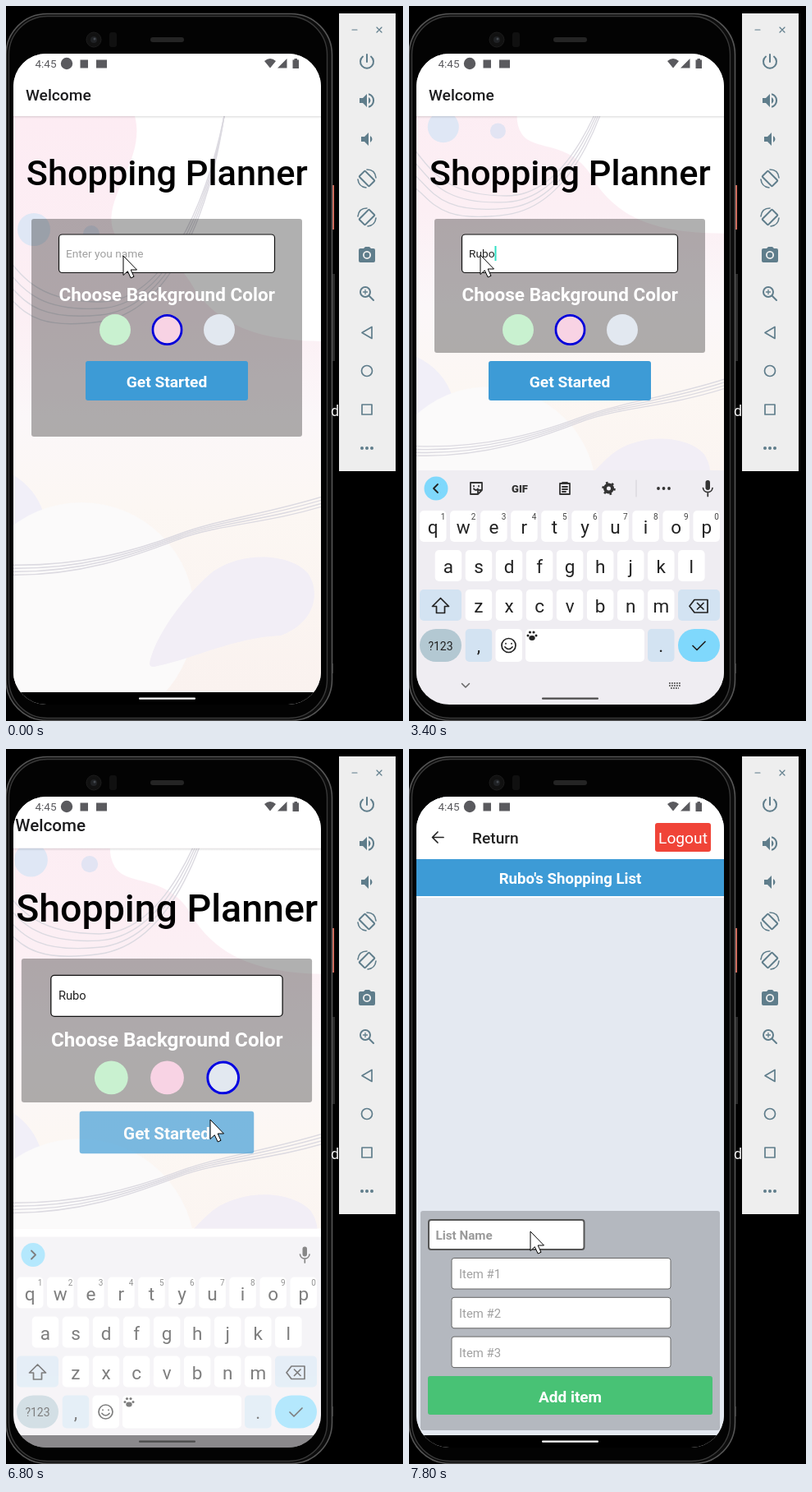
An HTML page for the animation above (8 s loop, 484 by 870 pixels).

```html
<!DOCTYPE html>
<html lang="en">
<head>
<meta charset="utf-8">
<title>Shopping Planner</title>
<style>
html, body { margin: 0; width: 100%; height: 100%; overflow: hidden; background: #000; }
svg { display: block; width: 484px; height: 870px; }
text { font-family: Roboto, sans-serif; }
.m { font-weight: 500; }
.b { font-weight: 700; }
.mid { text-anchor: middle; }
.line { stroke-linecap: round; stroke-linejoin: round; }
.line:not([fill]) { fill: none; }
</style>
</head>
<body>
<svg viewBox="0 0 484 870" xmlns="http://www.w3.org/2000/svg">
<defs>
  <clipPath id="screenClip"><rect x="9" y="58" width="375" height="792" rx="40"/></clipPath>
  <clipPath id="bodyClip"><rect id="bodyRect" x="9" y="134" width="375" height="701"/></clipPath>
  <linearGradient id="paper" x2="0" y2="1">
    <stop offset="0" stop-color="#fdecf3"/><stop offset=".35" stop-color="#fceff4"/>
    <stop offset=".52" stop-color="#fbf7f9"/><stop offset=".68" stop-color="#fcf7f3"/><stop offset="1" stop-color="#faf2ef"/>
  </linearGradient>
  <linearGradient id="shade" x2="0" y2="1">
    <stop offset="0" stop-color="#000" stop-opacity=".12"/><stop offset="1" stop-color="#000" stop-opacity="0"/>
  </linearGradient>
</defs>
<rect width="484" height="870"/>

<!-- phone body -->
<rect x="396" y="218" width="4" height="54" fill="#e0705f"/>
<rect x="397" y="326" width="4" height="106" fill="#292929"/>
<rect x="396" y="800" width="3" height="12" fill="#333"/>
<rect x="0" y="9.500" width="397.500" height="860" rx="50" fill="#0c0c0c" stroke="#555" stroke-width="1.600"/>
<rect x="3.500" y="12.500" width="388" height="854" rx="47" fill="#030303" stroke="#383838" stroke-width="1.400"/>
<circle cx="107" cy="41" r="9" fill="#111" stroke="#1c1c1c"/>
<circle cx="107" cy="41" r="4" fill="#202225"/>
<circle cx="108" cy="40" r="1.500" fill="#454a50"/>
<rect x="126" y="32" width="9" height="18" rx="3" fill="#101010"/>
<rect x="176" y="38" width="41" height="6" rx="3" fill="#242424"/>
<text x="396" y="499" font-size="18" fill="#eee">d</text>

<!-- emulator toolbar -->
<rect x="406" y="9" width="69" height="557" fill="#eee"/>
<g class="line" stroke="#5f7d8b" stroke-width="2">
  <path stroke-width="1.200" d="M422 29h6M452 26l6 6m0-6l-6 6"/>
  <path d="M440 59v9M435 61.500a8 8 0 1 0 10 0"/>
  <g id="turn">
    <rect x="-8.500" y="-5" width="17" height="10" rx="1" transform="translate(440 210) rotate(45)"/>
    <path stroke-width="1.600" d="M440 199q10 0 11 10M429 211q1 9 10 10"/>
  </g>
  <use href="#turn" transform="matrix(-1 0 0 1 880 47)"/>
  <circle cx="438" cy="348" r="6"/><path d="M443 353l5 5"/><path stroke-width="1.300" d="M435.500 348h5m-2.500-2.500v5"/>
  <path stroke-width="1.700" d="M446 390.500v14l-12-7z"/>
  <circle cx="440" cy="444" r="6.500" stroke-width="1.700"/>
  <rect x="434" y="485" width="12" height="12" stroke-width="1.700"/>
</g>
<g fill="#5f7d8b">
  <path transform="translate(428 103)" d="M3 9v6h4l5 5V4L7 9zM16.500 12q0-2.700-2.500-4v8q2.500-1.300 2.500-4zM14 3.200v2.100a7 7 0 0 1 0 13.400v2.100a9 9 0 0 0 0-17.600z"/>
  <path transform="translate(428 150)" d="M5 9v6h4l5 5V4L9 9zM18.500 12q0-2.700-2.500-4v8q2.500-1.300 2.500-4z"/>
  <path fill-rule="evenodd" d="M432 295h4l2-2h5l2 2h3q2 0 2 2v13q0 2-2 2h-16q-2 0-2-2v-13q0-2 2-2zm8 3a5 5 0 1 0 .1 0z"/>
  <circle cx="440" cy="303" r="3.200"/>
  <circle cx="434" cy="538" r="2"/><circle cx="440" cy="538" r="2"/><circle cx="446" cy="538" r="2"/>
</g>

<g clip-path="url(#screenClip)">
  <rect x="9" y="58" width="375" height="792" fill="#fff"/>

  <!-- shopping list page -->
  <g id="list">
    <rect x="9" y="58" width="375" height="777" fill="#e4e9f1"/>
    <rect x="9" y="58" width="375" height="76" fill="#fff"/>
    <path class="line" d="M42 107.500H29m6-6.500l-6.500 6.500 6.500 6.500" stroke="#222" stroke-width="1.700"/>
    <text class="m" x="77" y="115" font-size="19.200" fill="#222">Return</text>
    <rect x="300" y="90" width="68" height="35" rx="3" fill="#f04438"/>
    <text class="mid" x="334" y="115" font-size="19.200" fill="#fff">Logout</text>
    <rect x="9" y="134" width="375" height="45" fill="#3d9bd6"/>
    <rect x="9" y="179" width="375" height="2" fill="#fafcfe"/>
    <text class="b mid" x="196.500" y="164" font-size="18.600" fill="#fff">Rubo's Shopping List</text>
    <rect x="14" y="562" width="365" height="267" rx="3" fill="#b4b8bf"/>
    <rect x="24" y="573" width="189.500" height="36" rx="3" fill="#fff" stroke="#555" stroke-width="2"/>
    <text class="b" x="32.500" y="597" font-size="15.200" fill="#999">List Name</text>
    <g id="items"></g>
    <rect x="23" y="763" width="347" height="47" rx="3" fill="#48c275"/>
    <text class="b mid" x="196.500" y="794.500" font-size="19" fill="#fff">Add item</text>
  </g>

  <!-- welcome page -->
  <g id="home">
    <rect x="9" y="58" width="375" height="76" fill="#fff"/>
    <g clip-path="url(#bodyClip)">
      <g id="art">
        <rect x="-2" y="134" width="397" height="701" fill="url(#paper)"/>
        <path d="M157 134C172 190 110 240 134 280C150 306 200 285 230 345C265 395 320 408 395 408V134z" fill="#fff"/>
        <path d="M-2 565Q35 582 46 618L-2 650z" fill="#f1eff8"/>
        <circle cx="92" cy="742" r="138" fill="#fbfafa"/>
        <path d="M175 800C180 770 215 720 250 690C285 663 345 665 368 690C385 715 375 752 335 766C280 768 225 795 185 803Q175 806 175 800z" fill="#f2eef6"/>
        <circle cx="34" cy="272" r="20" fill="#dfe7f5"/>
        <circle cx="104" cy="277" r="10" fill="#e2e4f3"/>
        <g id="strands" class="line" stroke="#dcdae1" stroke-width="1.400"></g>
      </g>
    </g>
    <rect x="9" y="134" width="375" height="3" fill="url(#shade)"/>
    <text class="m" x="24" y="115" font-size="19.200" fill="#1c1c1e">Welcome</text>
    <text class="m mid" x="196.200" y="217.500" font-size="43.300">Shopping Planner</text>
    <rect id="card" x="31" y="259" width="330" height="265" rx="3" fill="#000" fill-opacity=".31"/>
    <rect x="64.500" y="278" width="263" height="46.500" rx="4" fill="#fff" stroke="#111" stroke-width="1.200"/>
    <text id="field" x="73" y="306" font-size="13.700"></text>
    <rect id="caret" x="104" y="292" width="2" height="18" fill="#2fe0c4"/>
    <text class="b mid" x="196.200" y="359" font-size="22.500" fill="#fff">Choose Background Color</text>
    <circle cx="133" cy="394" r="19" fill="#c9f1d0"/>
    <circle cx="196.500" cy="394" r="19" fill="#f8d3e4"/>
    <circle id="pinkRing" cx="196.500" cy="394" r="17.600" fill="none" stroke="#0000d8" stroke-width="2.800"/>
    <g id="blue">
      <circle cx="260" cy="394" r="19" fill="#e2e8f0"/>
      <circle id="blueRing" cx="260" cy="394" r="17.600" fill="none" stroke="#0000e0" stroke-width="2.800"/>
    </g>
    <g id="start">
      <rect x="97" y="432" width="198" height="48" rx="3" fill="#3d9bd6"/>
      <text class="b mid" x="196" y="464" font-size="19.200" fill="#fff">Get Started</text>
    </g>
  </g>

  <rect x="9" y="835" width="375" height="15"/>

  <!-- keyboard -->
  <g id="keyboard">
    <rect x="9" y="565" width="375" height="285" fill="#efedf2"/>
    <circle cx="33" cy="587" r="14.500" fill="#7fd8fc"/>
    <path id="chevron" class="line" stroke="#222" stroke-width="1.800"/>
    <g id="tools">
      <g class="line" stroke="#333" stroke-width="1.800">
        <path d="M75 580h14v9l-5 5h-9zM84 594v-5h5M79 584v.5m6-.5v.5m-6 3q3 3 5 0"/>
        <path d="M184 581h12v13h-12zM187 580h6M187 585h6m-6 3h6m-6 3h4"/>
        <circle cx="243.500" cy="587" r="4.500" stroke-width="4"/>
        <circle cx="243.500" cy="587" r="7" stroke-width="2.500" stroke-dasharray="2.500 4.830" stroke-linecap="butt"/>
        <path d="M277 577v20" stroke="#d2d0d6" stroke-width="1"/>
      </g>
      <text class="mid" x="135" y="591.500" font-size="13" font-weight="900" fill="#333">GIF</text>
      <g fill="#333"><circle cx="304" cy="587" r="1.900"/><circle cx="310.500" cy="587" r="1.900"/><circle cx="317" cy="587" r="1.900"/></g>
    </g>
    <rect x="361.500" y="577" width="5.500" height="12" rx="2.750" fill="#333"/>
    <path class="line" d="M358.500 586.500a5.800 5.800 0 0 0 11.500 0M364.300 593v3.500" stroke="#333" stroke-width="1.700"/>
    <g id="keys"></g>
    <path id="shift" class="line" d="M38.500 720.500l10 10h-5v8h-10v-8h-5z" fill="none" stroke="#222" stroke-width="1.700"/>
    <g class="line" stroke="#222" stroke-width="1.700">
      <path d="M348 722.500h16v15.500h-16l-6-7.750zM351.500 726.500l7.500 7.500m0-7.500l-7.500 7.500"/>
      <circle cx="121.500" cy="778" r="8.500"/><path d="M118 775.500v.5m7-.5v.5M117 780q4.500 5 9 0M346 778.500l5 5 10-10"/>
    </g>
    <g fill="#222">
      <ellipse cx="150" cy="769" rx="3.700" ry="2.900"/><circle cx="145" cy="766" r="1.500"/>
      <circle cx="147.500" cy="762" r="1.600"/><circle cx="152" cy="762" r="1.600"/><circle cx="155" cy="766" r="1.500"/>
    </g>
    <g id="navIcons">
      <path class="line" d="M64.500 824.500l4.500 4.500 4.500-4.500" stroke="#666" stroke-width="1.500"/>
      <path d="M317 824h14M317 827h14M319 830h10" stroke="#666" stroke-width="1.800" stroke-dasharray="1.800 1.200"/>
    </g>
  </g>
  <rect id="pill" x="162" y="841.500" width="69" height="2.200" rx="1"/>

  <!-- status bar -->
  <g fill="#5a5a5e">
    <text x="35.500" y="75" font-size="13.500">4:45</text>
    <circle cx="74" cy="70" r="7.200"/>
    <rect x="90.500" y="65.500" width="9.500" height="10"/>
    <rect x="110" y="65.500" width="13" height="10"/>
    <path d="M315 67q7-6 14 0l-7 8.500zM331 75.500h11.500v-11.500zM349.500 65.500h2v-1.500h3.500v1.500h2v10.500h-7.500z"/>
  </g>
</g>

<path id="cursor" d="M0 0V23.500L5.300 18.700L9.200 27L13 25.300L9.200 17H16.500z" fill="#fff" stroke="#000" stroke-linejoin="round"/>
</svg>

<script>
const $ = id => document.getElementById(id);
const set = (id, attrs) => { for (const k in attrs) $(id).setAttribute(k, attrs[k]); };
const show = (id, on) => set(id, { visibility: on ? 'visible' : 'hidden' });

function add(parent, tag, attrs, label = '') {
  const el = document.createElementNS('http://www.w3.org/2000/svg', tag);
  for (const k in attrs) el.setAttribute(k, attrs[k]);
  el.textContent = label;
  return $(parent).appendChild(el);
}

// Linear interpolation through [time, value] pairs
function track(points, t) {
  const i = points.findIndex(p => p[0] > t);
  if (i < 0) return points[points.length - 1][1];
  if (i === 0) return points[0][1];
  const [t0, a] = points[i - 1], [t1, b] = points[i];
  return a + (b - a) * (t - t0) / (t1 - t0);
}

for (let i = 0; i < 3; i++) {
  const y = 619.5 + i * 47.8;
  add('items', 'rect', { x: 52, y, width: 267, height: 37.5, rx: 3, fill: '#fff', stroke: '#666' });
  add('items', 'text', { x: 61, y: y + 24.5, 'font-size': 14.9, fill: '#a0a0a0' }, 'Item #' + (i + 1));
}

for (let i = 0; i < 4; i++) {
  const d = i * 4;
  add('strands', 'path', { d: `M-2 ${680 + d}C90 ${683 + d} 160 ${662 + d / 2} 210 ${643 + d / 2}S320 ${618 + d} 395 ${594 + d}` });
  add('strands', 'path', { d: `M266 134C${242 + d / 2} 250 ${190 + d} ${360 + d} 115 ${360 + d * 2}S20 ${330 + d * 3} -2 ${302 + d * 4}` });
}

const letters = [];
function key(x, y, w, label, fill = '#fff', size = 22.5, rx = 5) {
  const h = y > 750 ? 40 : 38;
  add('keys', 'rect', { x, y, width: w, height: h, rx, fill });
  return add('keys', 'text', { x: x + w / 2, y: y + 28, 'font-size': size, class: 'mid', fill: '#222' }, label);
}
[['qwertyuiop', 13], ['asdfghjkl', 31.7], ['zxcvbnm', 68.7]].forEach(([row, x0], r) => {
  [...row].forEach((c, i) => {
    const x = x0 + i * 37.05, y = 614 + r * 48;
    letters.push(key(x, y, 32.5, c));
    if (r === 0) add('keys', 'text', { x: x + 28.5, y: y + 10.5, 'font-size': 10, class: 'mid', fill: '#444' }, (i + 1) % 10);
  });
});
key(13, 710, 51, '', '#d3e3f2');
key(328, 710, 51, '', '#d3e3f2');
key(13, 758, 51, '?123', '#b3c8d2', 14, 20).setAttribute('y', 783.5);
key(68.7, 758, 32.5, ',', '#d3e3f2');
key(105.5, 758, 32.5, '');
key(142, 758, 145, '');
key(291, 758, 32.5, '.', '#d3e3f2');
key(328, 758, 51, '', '#7fd8fc', 22, 20);

const name = 'Rubo', typed = [2400, 2800, 3000, 3400];
const cursorX = [[200, 143], [1000, 87], [3800, 87], [4800, 258], [5600, 260], [5800, 252], [6000, 249], [7200, 249], [7800, 148]];
const cursorY = [[200, 304], [1000, 303], [3800, 303], [4800, 392], [5600, 396], [5800, 436], [6000, 451], [7200, 451], [7800, 587]];
const zoom = s => `translate(196.5 313) scale(${s}) translate(-196.5 -313)`;

function draw(t) {
  const small = t >= 1400, upper = t < 2400;

  set('bodyRect', { height: small ? 431 : 701 });
  set('art', { transform: small ? 'translate(196.5 349.5) scale(.952) translate(-196.5 -484.5)' : '' });
  set('card', { height: small ? 163 : 265 });

  const text = name.slice(0, typed.filter(k => t >= k).length);
  $('field').textContent = text || 'Enter you name';
  set('field', { fill: text ? '#222' : '#a0a0a0' });
  const lastInput = Math.max(1200, ...typed.filter(k => t >= k));
  show('caret', t >= 1200 && t < 6400 && (t - lastInput) % 1000 < 500);
  set('caret', { x: text ? 73 + $('field').getComputedTextLength() : 73 });

  show('pinkRing', t < 5800);
  show('blueRing', t >= 5800);
  set('blue', { opacity: track([[5400, 1], [5600, .3], [5800, .7], [6000, 1]], t) });
  set('start', { opacity: track([[6200, 1], [6400, .4], [6800, .68], [7000, 1]], t) });

  // page change: the old page grows and fades while the new one settles
  const p = track([[6600, 0], [6800, .49], [7000, .85], [7200, 1]], t);
  set('home', { transform: zoom(1 + .15 * p), opacity: track([[6800, 1], [7000, .73], [7200, 0]], t) });
  set('list', { transform: zoom(.85 + .15 * p), opacity: track([[6800, 0], [7000, .5], [7200, 1]], t) });

  const drop = track([[1000, 120], [1200, 60], [1400, 0], [6600, 0], [6800, 28.5], [7000, 60]], t);
  set('keyboard', {
    transform: `translate(0 ${drop})`,
    opacity: track([[1000, 0], [1200, .7], [1400, 1], [6600, 1], [6800, .58], [7000, 0]], t)
  });
  const closing = t >= 6600;
  set('chevron', { d: closing ? 'M31 582l5 5-5 5' : 'M35 582l-5 5 5 5' });
  show('tools', !closing);
  show('navIcons', !closing);
  set('navIcons', { opacity: track([[2200, .3], [2600, 1]], t) });
  letters.forEach(el => el.textContent = upper ? el.textContent.toUpperCase() : el.textContent.toLowerCase());
  set('shift', { fill: upper ? '#111' : 'none' });

  show('pill', t < 7000 || t >= 7400);
  const shade = Math.round(track([[2200, 176], [2600, 75]], t));
  set('pill', { fill: t < 1200 || t >= 7400 ? '#fff' : `rgb(${shade},${shade},${shade})` });

  set('cursor', { transform: `translate(${track(cursorX, t)} ${track(cursorY, t)})` });
}

const begin = performance.now();
let shown = -1;
function tick() {
  const t = Math.floor(((performance.now() - begin) % 8000) / 200) * 200;
  if (t !== shown) draw(shown = t);
  requestAnimationFrame(tick);
}
tick();
</script>
</body>
</html>
```
